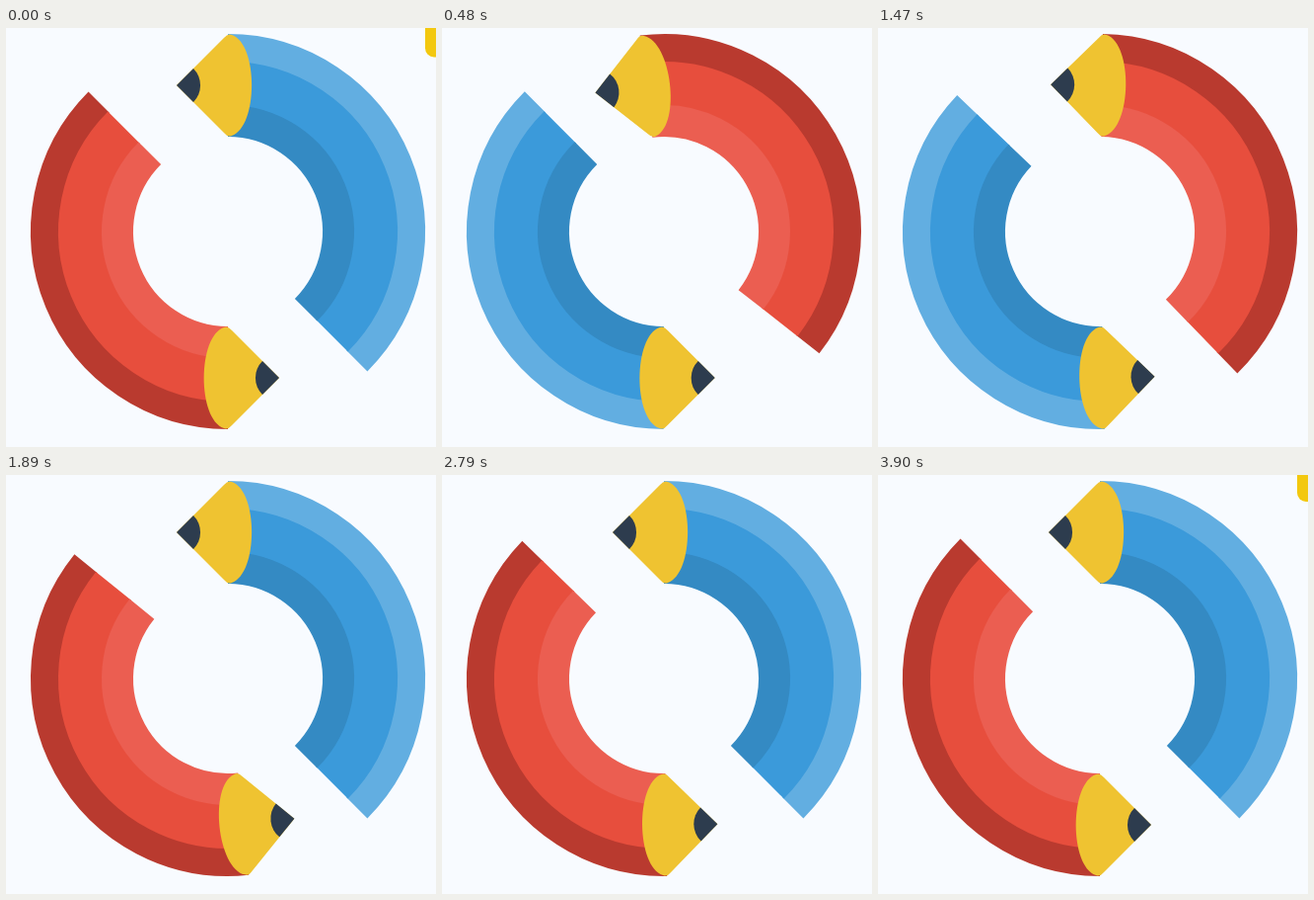
Animation of 436 by 424 pixels, one loop 5.9 s. Source, as an HTML page:

```html
<!DOCTYPE html>
<html>
<head>
<meta charset="utf-8">
<style>
  html, body { margin: 0; width: 100%; height: 100%; overflow: hidden; background: #f8fbff; }
  svg { display: block; }
</style>
</head>
<body>
<svg id="stage" width="436" height="424" viewBox="0 0 436 424">
  <rect id="tab" x="425" y="-60" width="60" height="60" rx="9" fill="#f3c80f"/>
</svg>
<script>
const LOOP = 5900, TURN = 420, SECOND = 1470;
const stage = document.getElementById('stage');
const tab = document.getElementById('tab');

// Arc from the top of the ring, 135 degrees clockwise
function band(inner, outer, color) {
  const r = (inner + outer) / 2, e = r * Math.SQRT1_2;
  return `<path d="M0 ${-r}A${r} ${r} 0 0 1 ${e} ${e}" fill="none" stroke="${color}" stroke-width="${outer - inner}"/>`;
}

function pencil(outer, middle, inner) {
  const g = document.createElementNS('http://www.w3.org/2000/svg', 'g');
  g.innerHTML = band(170, 200, outer) + band(126, 172, middle) + band(96, 128, inner) +
    '<path d="M-52 -148L-4 -196Q0 -201 4 -199C31 -190 31 -106 4 -97Q0 -95 -4 -100Z" fill="#efc331"/>' +
    '<path d="M-52 -148l17 -17a24 24 0 0 1 0 34Z" fill="#2d3c4e"/>';
  stage.append(g);
  return g;
}

const mix = (a, b, u) => a + (b - a) * u;

function ease(u) {
  u = Math.min(1, Math.max(0, u));
  return (1 - Math.cos(Math.PI * u)) / 2;
}

// Damped swing that follows a half turn
function swing(t, size, period, phase = 0) {
  t = Math.max(0, t);
  return size * Math.exp(-t / 475) * Math.cos(2 * Math.PI * t / period + phase);
}

// Two half turns, each settling with its own swing
function angle(t, first, second) {
  const half = mix(0, 180 + swing(t - TURN, ...first), ease(t / TURN));
  const t2 = t - SECOND;
  return mix(half, 360 + swing(t2 - TURN, ...second), ease(t2 / TURN));
}

const blue = pencil('#62aee1', '#3b9ada', '#348ac3');
const red = pencil('#b93a2f', '#e74e3d', '#eb5e51');

const spin = (g, a) => g.setAttribute('transform', `translate(225 206) rotate(${-a})`);

function draw(t) {
  spin(blue, angle(t, [15.6, 1166, 1.25], [0, 1]));
  spin(red, 180 + angle(t, [8.1, 1880], [6.1, 900]));
  tab.setAttribute('y', mix(29.5, 0, ease(t / 300)) + 27 * ease((t - 3630) / 270) - 60);
}

const start = performance.now();
function tick() {
  draw((performance.now() - start) % LOOP);
  requestAnimationFrame(tick);
}
tick();
</script>
</body>
</html>
```
